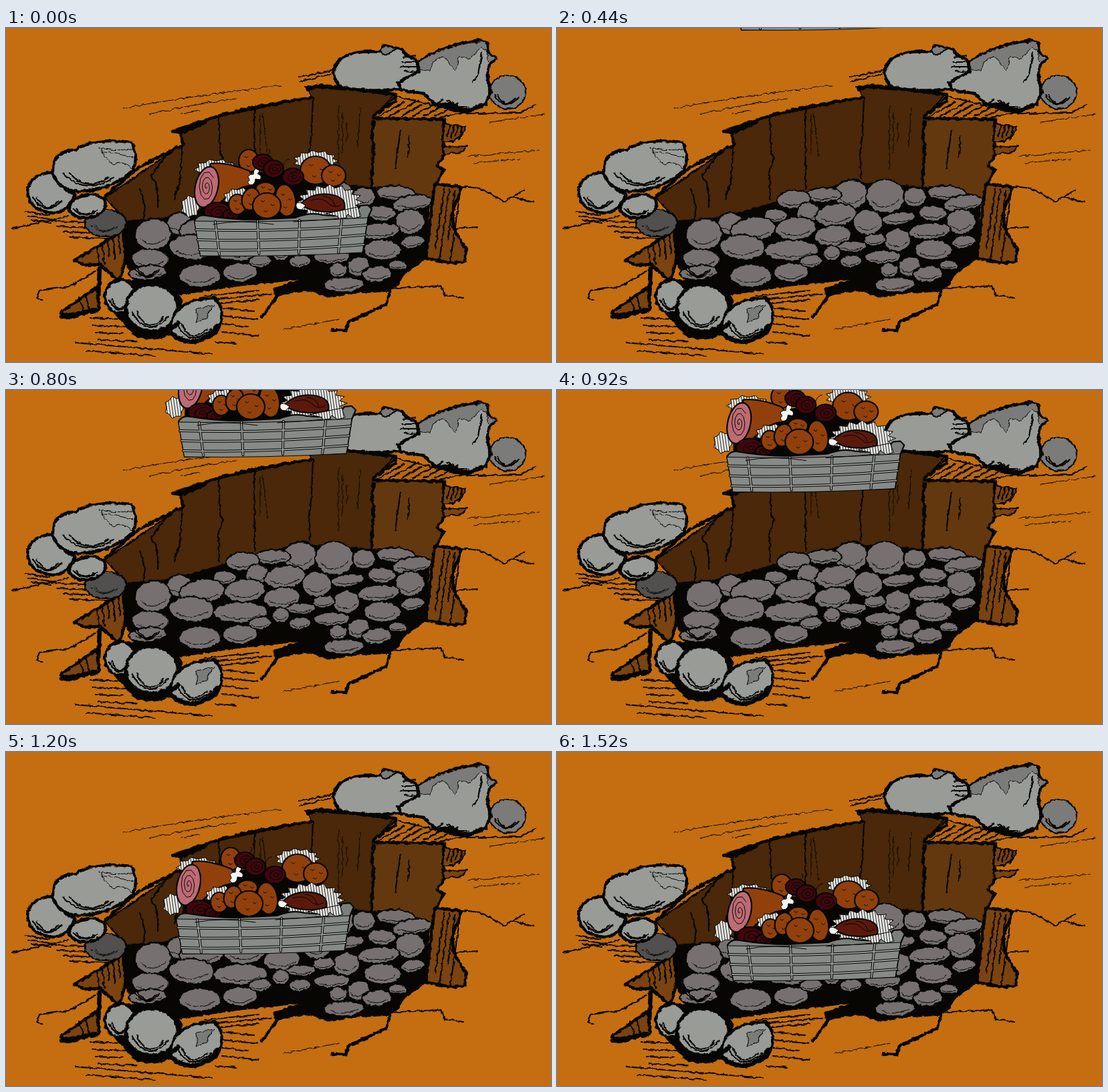
These frames come from a looping animation (815 by 500 pixels, 1.6 s). An HTML page:

```html
<!DOCTYPE html>
<html lang="en">
<head>
<meta charset="utf-8">
<title>Cooking pit</title>
<style>
html, body { margin: 0; width: 100%; height: 100%; overflow: hidden; background: #c46e11; }
svg { display: block; width: 815px; height: 500px; }
path, ellipse { stroke: #050603; stroke-linejoin: round; stroke-linecap: round; }
.line { fill: none; }
.heavy { stroke-width: 6.5; }
.thick { stroke-width: 4.5; }
.mid { stroke-width: 2.2; }
.thin { stroke-width: 1; }
.black { fill: #080603; }
.wall { fill: #4a2809; }
.side { fill: #63380f; }
.board { fill: #7b430f; }
.ledge { fill: #b9670f; }
.rock { fill: #999b97; }
.shade { fill: #7b7b79; }
.dark { fill: #51504f; }
.pebble { fill: #767170; }
.food { fill: #91400b; }
.beet { fill: #3f070d; }
.ham { fill: #bd6b74; }
.roast { fill: #5b190c; }
.bone { fill: #f3f3ef; }
.rim { fill: #7c807d; }
.front { fill: #878b88; }
.bar { stroke: #959995; stroke-width: 2; }
.paper { fill: url(#paper); }
</style>
</head>
<body>
<svg viewBox="0 0 815 500">
<defs>
  <filter id="rough" filterUnits="userSpaceOnUse" x="0" y="0" width="815" height="500" color-interpolation-filters="sRGB">
    <feTurbulence type="fractalNoise" baseFrequency=".14" numOctaves="2" seed="4"/>
    <feDisplacementMap in="SourceGraphic" scale="5" xChannelSelector="R" yChannelSelector="G"/>
  </filter>
  <pattern id="paper" width="4" height="12" patternUnits="userSpaceOnUse" patternTransform="rotate(-8)">
    <rect width="4" height="12" fill="#e9e9e4"/>
    <rect width="1" height="12" fill="#222"/>
  </pattern>
</defs>

<g filter="url(#rough)">
  <!-- ground -->
  <path class="line thin" d="M174 120Q290 100 411 86M214 129Q280 114 344 106M262 128l28-4M690 192l107-9M700 202l68-6M724 141l81-12M416 451l82-15"/>
  <path class="line mid" d="M437 74l50-11M440 80l46-11M10 300l82-18M690 128l80-1 22-12"/>
  <path class="line mid" d="M133 364l-38 23-45 6-5 12 10 1M104 471l204 17M120 483l104 8M312 470l32 2M570 390l80-4 6 14 28 4"/>
  <path class="line thick" d="M470 388l-58 7-12 14-17 23M575 394l-7 20-56 26-4 13-20-1"/>
  <path class="line mid" d="M681 237l28 3 36 20 30-17M758 253l32 8M668 300l37-2"/>
  <g id="scratches"></g>
  <path class="black" d="M400 390l70-23 125 2-10 18-105 16-25-10-52 8z"/>

  <!-- pit -->
  <path class="wall mid" d="M148 254L264 174l-2-14-14-6 72-22 137-28-9-16 135 10-35 36v126L190 370l-12-25 2-57z"/>
  <path class="line thick" d="M150 250l50-42 64-33-2-18-12-3 70-23 52-13 85-14"/>
  <path class="line heavy" d="M250 154h18l30-14M452 92l14-5 50 3 64 9"/>
  <path class="line mid" d="M318 132l2 52 4 10-6 22 1 40M371 119l1 122M459 104l-2 50-4 45 2 27M264 172l-4 58-8 26M240 190l-22 30 9 24v24M200 240l8 28-4 24"/>
  <path class="line thin" d="M380 130v60M384 128l7 64M497 117v92M510 142v28M503 126v60M530 120l-4 58"/>
  <path class="side" style="stroke:none" d="M548 134h108l-6 31 5 25-10 17 11 7-16 24-6 32h-87z"/>
  <path class="ledge mid" d="M583 102l102 25-42 8h-95z"/>
  <path class="line thick" d="M583 98l-1 11-32 22v4l106 2M550 140l-3 20 3 20-4 58M656 137l-3 28 2 24-10 18 10 6-15 26-10 95"/>
  <path class="line mid" d="M590 152l-8 58M603 163l-2 30"/>
  <path class="board mid" d="M655 143l32 5-5 12-14 10h-15zM654 178l36-1-9 9-26 3z"/>
  <path class="board thick" d="M641 233l40 5-13 36 1 25 19 32-2 19-17 2-41-7z"/>
  <path class="black" d="M178 290l72-8 130-36 60-16 140 10 54 12-6 93-38 29-15 20-97 6-16-26-112 12-110 16-45-18-17-34z"/>
  <g id="bed"></g>
  <path class="board thick" d="M178 302l-76 46 15 7 24-1 28 26 9-30z"/>
  <path class="board thick" d="M136 388l-54 38 8 9 49-14z"/>
  <path class="line heavy" d="M177 296l2 50M140 360l-2 44M84 432l52-10"/>

  <!-- rocks -->
  <path class="rock thick" d="M32 245Q34 218 71 216 76 236 103 249 92 277 70 277 34 273 32 245z"/>
  <path class="rock thick" d="M70 213Q70 184 105 182 130 164 187 171 199 190 190 213 150 248 100 244 70 235 70 213z"/>
  <path class="line thin" d="M139 179q20 6 50 2M142 180q0 12 19 25 14-8 27 4M146 186q16 0 44 8"/>
  <ellipse class="dark mid" cx="149" cy="292" rx="31" ry="20"/>
  <path class="rock thick" d="M94 268Q102 249 130 249 156 254 146 273 128 289 108 283 94 278 94 268z"/>
  <path class="black thick" d="M150 410l30 34q20 32 66 14l16-50-12-18-80-14z"/>
  <ellipse class="rock thick" cx="171" cy="402" rx="23" ry="25"/>
  <ellipse class="rock thick" cx="218" cy="419" rx="39" ry="35"/>
  <path class="rock thick" d="M247 440Q256 406 312 404 332 424 315 455 292 475 256 466 244 456 247 440z"/>
  <path class="shade thin" d="M284 420l28-5-10 12-2 8-16 6 3-9z"/>
  <path class="rock thick" d="M490 66Q494 30 566 36l-2-10 28 6 8 10 12 4 6 16-30 29q-50 6-87-3-11-8-11-22z"/>
  <path class="shade mid" d="M558 35l7-8 20 3-18 11z"/>
  <ellipse class="shade mid" cx="750" cy="96" rx="27" ry="25"/>
  <path class="rock thick" d="M586 82q16-10 32-16l-1-16q38-25 92-32l11 4v12l12 12-9 9-4 19 7 22-12 20-24 10-28-13-20 3-17-18-34-5z"/>
  <path class="shade thin" d="M619 62l-1-12q46-28 100-30l1 14-9-5-16 17-16-4-6 22-18-22-14 8-6 14z"/>
  <path class="shade thin" d="M720 36l11 10-9 8z"/>
  <path class="line mid" d="M594 44l18-3M592 51h20M590 58h24M596 64l18 2M712 36l-6 32-8 12M722 60v40M660 108l16 10h16"/>
  <path class="line heavy" d="M640 114l50 10 26-10M180 438q24 44 78 4M248 458q38 28 68-12"/>
  <g id="shading"></g>
</g>
<g id="basket"></g>
</svg>

<script>
const LOOP = 1600, STEP = 40, FADE = 320;
const $ = id => document.getElementById(id);
const path = (cls, d) => `<path class="${cls}" d="${d}"/>`;
const oval = (cls, x, y, rx, ry, turn = 0) =>
  `<g transform="translate(${x} ${y}) rotate(${turn})"><ellipse class="${cls}" rx="${rx}" ry="${ry}"/></g>`;
const times = (n, f) => Array.from({ length: n }, (_, i) => f(i)).join('');

// n strokes set (dx, dy) apart, each about (lx, ly) long
const fan = (n, x, y, dx, dy, lx, ly, cls = 'mid') => path('line ' + cls, times(n, i => {
  const k = 1 + .2 * Math.sin(i * 2.4);
  return `M${x + i * dx} ${y + i * dy}l${lx * k} ${ly * k}`;
}));

$('scratches').innerHTML =
  fan(4, 68, 289, 9, 8, 48, 2) + fan(3, 30, 275, 4, 6, 36, 6) +
  fan(4, 126, 434, 4, 11, 50, 2) + fan(3, 298, 401, 8, 6, 80, -8) +
  fan(4, 324, 419, 0, 12, 46, 5);

// Rounded shading near the bottom of a stone
const shade = (x, y, rx, ry, cls = 'mid') => path('line ' + cls, [.62, .82].map(k =>
  `M${x - rx * k} ${y + ry * .2}Q${x - rx * .2} ${y + ry * (k + .7)} ${x + rx * k * .8} ${y + ry * .45}`).join(''));

$('shading').innerHTML =
  shade(128, 212, 52, 26) + shade(64, 250, 28, 22) + shade(120, 267, 24, 14) +
  shade(218, 419, 36, 31) + shade(171, 402, 20, 22) + shade(284, 438, 34, 28) +
  shade(750, 96, 24, 20) + shade(149, 292, 26, 14, 'thin') + shade(212, 354, 26, 20) +
  fan(6, 557, 132, 17, 0, 38, -21) + fan(4, 655, 240, 8, 2, -13, 92) +
  fan(4, 664, 146, 6, 1, -4, 16) + fan(5, 136, 328, 8, -4, 3, 26) + fan(2, 110, 404, 9, -4, 7, 24);

// Pebbles by shape (height to width): x, y, half width
const round = [[440,249,25], [491,252,29], [220,309,27], [259,293,19], [376,276,17], [465,291,22],
  [604,290,22], [509,317,20], [411,337,13], [535,253,17], [527,357,17], [497,363,13]];
const plain = [[354,257,25], [278,328,34], [293,302,34], [357,300,31], [417,280,31], [413,311,28],
  [475,317,17], [327,281,18], [562,277,21], [563,332,28], [216,346,28], [350,366,26], [290,371,31],
  [439,349,17], [380,349,17], [608,320,18], [586,355,14], [555,368,22]];
const flat = [[398,250,28], [583,247,29], [607,262,30], [511,285,25], [557,304,32],
  [441,327,22], [351,333,41], [212,366,28], [487,343,27], [505,384,30]];

const stones = [[round, .87], [plain, .55], [flat, .38]]
  .flatMap(([list, k]) => list.map(([x, y, r]) => [x, y, r, r * k]))
  .sort((a, b) => a[1] - b[1]);
$('bed').innerHTML = stones.map(([x, y, rx, ry]) =>
  oval('pebble mid', x, y, rx, ry, (x * 7 + y) % 13 - 9) +
  path('line thin', `M${x - rx * .7} ${y + ry * .3}Q${x} ${y + ry} ${x + rx * .7} ${y + ry * .2}`)).join('');

// Crumpled paper with a toothed edge
const frill = (x, y, rx, ry, n) => path('paper thin', 'M' + times(n * 2, i => {
  const a = Math.PI * i / n, k = i % 2 ? .8 : 1;
  return `${x + rx * k * Math.cos(a)} ${y + ry * k * Math.sin(a)} `;
}) + 'z');

const potato = (x, y, rx, ry, turn) => oval('food mid', x, y, rx, ry, turn) +
  path('line thin', [[-.4, -.4], [.3, -.1], [-.2, .4]].map(([u, v]) =>
    `M${x + u * rx} ${y + v * ry}l3 2 2-2`).join(''));

const beet = (x, y, rx, ry) => oval('beet mid', x, y, rx, ry) +
  oval('line thin', x + 2, y, rx * .6, ry * .55, -15) + oval('line thin', x + 2, y, rx * .25, ry * .2);

const spiral = (x, y, rx, ry, turns) => path('line thin', 'M' + times(turns * 10, i => {
  const a = i * Math.PI / 5, k = i / turns / 10;
  return `${x + rx * k * Math.cos(a)} ${y + ry * k * Math.sin(a)} `;
}));

const rails = times(3, i => `M${284 + i * 2.5} ${302 + i * 15}Q410 ${306 + i * 14.5} ${539 - i * 2} ${295 + i * 14.5}`);
const posts = times(4, i => `M${313 + i * 63} ${290 - i}l${6 - i * 3.6} 49`);

$('basket').innerHTML =
  frill(276, 267, 15, 17, 7) + frill(314, 212, 33, 16, 10) + frill(463, 199, 34, 16, 11) +
  path('black', 'M292 268l30-40 60-12 110 10 20 34-60 26-160 2z') +
  potato(363, 199, 15, 17) + potato(463, 213, 23, 21) + potato(490, 221, 18, 16) +
  path('food mid', 'M306 203Q330 200 364 214l10 14-6 8q-24 0-50 28l-22 2z') +
  oval('ham mid', 300, 238, 17, 31, 13) + spiral(300, 238, 13, 25, 3) +
  path('bone thin', 'M362 222q4-4 8-3 0-10 7-9 4 4-1 8 8 3 4 9l-7-1q0 9-8 9-6-4-1-7z') +
  beet(384, 201, 15, 12) + beet(400, 211, 15, 13) + beet(429, 223, 16, 13) +
  path('line thin', 'M391 190q6-3 2-9M414 206q4-10 10-10') +
  frill(350, 254, 26, 15, 9) + frill(484, 261, 50, 27, 16) +
  beet(316, 275, 20, 14) + beet(336, 280, 12, 8) +
  potato(346, 264, 13, 15) + potato(388, 242, 15, 11) + potato(366, 256, 13, 17, 15) +
  potato(418, 258, 15, 24, -9) + potato(390, 266, 21, 19) +
  path('roast mid', 'M440 264q16-18 44-15 26 4 22 22-10 5-30 4-20 0-36-11z') +
  path('line thin', 'M456 258q16-6 26 4t20 2M474 252q14 0 18 14') +
  path('bone thin', 'M434 263q4-5 14 3l-6 6q-10 0-8-9z') +
  path('rim mid', 'M282 288q6-10 18-7 36 6 72 6l60-3q24-9 42-4 30 4 50-6l6-8 11-1 6 6-6 14-8 51-242 5z') +
  path('paper thin', 'M478 278l48-10 5 14-11 3-9-6-10 16-5-13z') +
  path('front thin', 'M282 289q130 3 259-5l-8 52q-123 7-242 5z') +
  `<g style="stroke-width:4">${path('line', rails + posts)}</g>` + path('line bar', rails + posts) +
  path('line thin', 'M310 294q40-8 90 0M430 290q40-2 80-6');

// Drop path: time, dx, dy
const drop = [[280,-10,-364], [440,-15,-338], [800,-24,-241], [1040,-30,-126], [1200,-27,-39], [1520,-27,1]];
const end = drop.length - 1;
const slope = (i, c) => (drop[i + 1][c] - drop[i][c]) / (drop[i + 1][0] - drop[i][0]);

function tangent(i, c) {
  if (i === 0) return slope(0, c);
  if (i === end) return 0;
  const a = slope(i - 1, c), b = slope(i, c);
  return a * b > 0 ? 2 * a * b / (a + b) : 0;
}

function along(t, c) {
  if (t >= drop[end][0]) return drop[end][c];
  let i = 0;
  while (t >= drop[i + 1][0]) i++;
  const h = drop[i + 1][0] - drop[i][0], u = (t - drop[i][0]) / h, v = 1 - u;
  return v * v * (1 + 2 * u) * drop[i][c] + u * u * (3 - 2 * u) * drop[i + 1][c]
    + h * u * v * (v * tangent(i, c) - u * tangent(i + 1, c));
}

const basket = $('basket');
const start = performance.now();

function draw() {
  const t = Math.floor((performance.now() - start) % LOOP / STEP) * STEP;
  const fading = t < FADE;
  const x = fading ? 0 : along(t, 1), y = fading ? 0 : along(t, 2);
  basket.setAttribute('transform', `translate(${x} ${y})`);
  basket.style.opacity = fading ? 1 - (t / FADE) ** 3 : 1;
  basket.style.filter = fading && t ? `brightness(${Math.max(0, 1 - t / 190)})` : 'none';
  requestAnimationFrame(draw);
}
draw();
</script>
</body>
</html>
```
